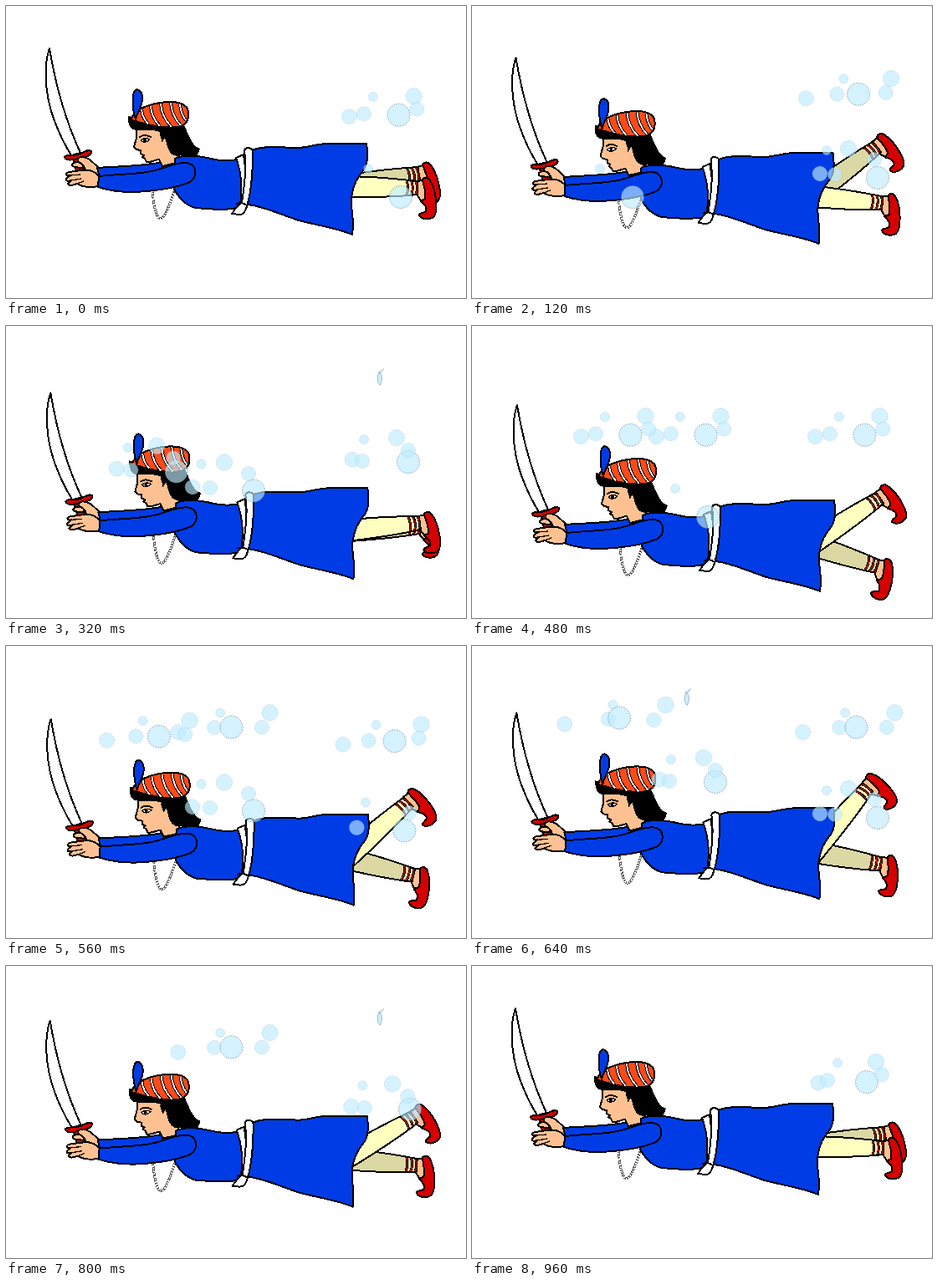
Write an HTML page that moves like this. It is 550x350 px and loops after 1 s.

```html
<!DOCTYPE html>
<html lang="en">
<head>
<meta charset="utf-8">
<title>Flying swordsman</title>
<style>
  html, body { margin: 0; width: 100%; height: 100%; overflow: hidden; background: #fff; }
  svg { display: block; width: 550px; height: 350px; }
  #hero { shape-rendering: crispEdges; }
  .ink { stroke: #000; stroke-width: 2; stroke-linejoin: round; stroke-linecap: round; }
  .line { fill: none; }
  .blue { fill: #003ce6; }
  .skin { fill: #ffc192; }
  .red { fill: #d60000; }
  .white { fill: #fff; }
  .bubble { fill: #bdebff; fill-opacity: .65; stroke: #8fa9b5; stroke-opacity: .6; stroke-width: .7; stroke-dasharray: 1.5 1.5; }
  .bubble.big { stroke: #707c84; stroke-opacity: .85; stroke-width: .9; }
</style>
</head>
<body>
<svg viewBox="0 0 550 350" xmlns="http://www.w3.org/2000/svg">
  <defs>
    <g id="shin">
      <path class="ink" d="M370 204 C430 203 466 207 492 210 L492 226 C465 229 430 230 370 229Z"/>
      <path class="line" d="M479 209 C481 215 481 221 479 227 M484.5 209 C487 215 487 221 484.5 227 M490 210 C492 215 492 221 490 226" stroke="#000" stroke-width="3"/>
      <path class="line" d="M479 210 C481 215 481 221 479 226 M484.5 210 C487 215 487 221 484.5 226 M490 211 C492 215 492 221 490 225" stroke="#b81818" stroke-width="1.3"/>
    </g>
    <g id="foot">
      <path class="ink skin" d="M491 210 L498 209 L503 222 L501 232 L496 233 L491 226Z"/>
      <path class="ink red" d="M498 208 C500 205 505 205 507 209 C511 215 513 223 514 232 C515 241 515 249 511 253 C506 257 497 256 494 251 C494 247 499 249 502 246 C504 241 500 237 496 234 L501 231 C503 224 499 215 498 208Z"/>
    </g>
  </defs>

  <g id="hero">
    <g id="farLeg" fill="#dcd8a4"><use class="foot" href="#foot"/><use href="#shin"/></g>
    <g id="nearLeg" fill="#ffffbf"><use class="foot" href="#foot"/><use href="#shin"/></g>

    <path class="line" d="M175 221 C176 234 179 255 185 255 C191 254 197 234 202 219" stroke="#555" stroke-width="2.8"/>
    <path class="line" d="M175 221 C176 234 179 255 185 255 C191 254 197 234 202 219" stroke="#fff" stroke-width="1.6" stroke-dasharray="2 1.2"/>

    <!-- sword -->
    <path class="ink white" d="M52 51 C45 70 46 105 57 135 C63 152 70 166 78 179 L89 176 C76 148 61 105 52 51Z"/>
    <path class="ink red" d="M80 183 L89 181 L94 197 L84 198Z"/>
    <path class="ink red" d="M70 181 C72 177 80 180 86 178 C92 176 98 171 102 174 C103 179 96 181 90 182 C82 184 72 187 70 181Z"/>

    <!-- far arm and hand -->
    <path class="ink skin" d="M111 194 C104 188 99 181 91 181 C85 181 84 186 88 188 C92 190 95 193 95 199 L111 204Z"/>
    <path class="ink skin" d="M89 188 C84 186 79 188 79 191 C80 194 86 193 90 194 C93 195 93 190 89 188Z"/>
    <path class="ink blue" d="M109 194 C135 192 165 192 187 187 L204 200 L112 206Z"/>

    <!-- face and hair -->
    <path class="ink skin" d="M156 144 L156 158 L153 169 L156 172 L161 173 L161 177 L165 179 L163 181 L166 183 L168 187 C173 188 179 184 183 184 L187 192 L208 187 L196 150Z"/>
    <path d="M146 132 C145 145 150 150 160 149 C168 149 176 148 184 151 C182 155 187 158 186 164 L190 158 C193 166 193 179 205 180 C214 178 221 181 228 181 L232 171 C222 168 219 155 213 143Z"/>
    <path class="ink line" d="M160 157 C164 154 169 155 173 157"/>
    <path d="M161 161 C164 158 169 158 172 160 C168 164 164 164 161 161Z" fill="#fff" stroke="#000" stroke-width="1.3"/>
    <circle cx="166" cy="161" r="2"/>

    <!-- turban -->
    <path class="ink" fill="#ff4a18" d="M150 135 C152 126 166 119 184 116 C205 113 218 117 218 128 C219 138 214 143 206 145 C190 147 171 143 155 138 C151 137 149 137 150 135Z"/>
    <g id="folds" class="line"></g>
    <path class="ink blue" d="M155 136 C151 124 149 101 157 100 C165 102 164 114 160 123 C158 128 156 131 155 136Z"/>

    <!-- robe -->
    <path class="ink blue" d="M202 183 C212 178 228 179 245 183 C258 186 270 186 280 183 L294 173 C306 168 316 169 350 170 C364 169 372 165 386 165 L431 165 C433 178 433 188 428 196 C420 206 415 214 413 230 C412 246 417 254 414 274 C396 266 372 263 350 257 C326 249 310 241 290 238 L281 241 C262 246 242 243 226 242 C211 237 207 229 201 220Z"/>
    <path class="ink blue" d="M111 204 C138 201 168 202 188 194 C199 190 212 186 220 189 C228 193 229 205 220 211 C201 219 175 222 152 223 C136 223 122 221 110 217 C108 212 109 207 111 204Z"/>

    <!-- sash -->
    <path class="ink white" d="M275 182 L284 178 C288 200 287 224 282 238 L280 238 C283 218 281 198 275 182Z"/>
    <path class="ink white" d="M285 173 C287 168 295 170 295 175 C295 202 293 224 288 240 C286 247 284 250 279 250 L270 249 C274 243 278 237 282 236 C285 215 288 195 285 173Z"/>
    <path class="ink line" d="M276 237 C282 235 285 237 288 239"/>

    <!-- near hand -->
    <path class="ink skin" d="M111 204 C104 196 97 196 90 197 L75 199 C70 201 72 204 77 203 L73 206 C70 209 73 211 78 209 L74 213 C75 216 80 215 85 213 C91 217 102 218 110 216Z"/>
    <path class="ink line" d="M77 203 L89 202 M78 209 L90 207 M85 213 L93 210" style="stroke-width:1.3"/>
  </g>

  <g id="air"></g>
</svg>

<script>
const FRAME = 40, COUNT = 25;
const $ = id => document.getElementById(id);

function add(parent, tag, attrs) {
  const el = document.createElementNS('http://www.w3.org/2000/svg', tag);
  for (const k in attrs) el.setAttribute(k, attrs[k]);
  return parent.appendChild(el);
}

// piecewise linear; the last segment runs on past its end
function lerpKeys(times, values, t) {
  let i = 0;
  while (i < times.length - 2 && t > times[i + 1]) i++;
  const k = (t - times[i]) / (times[i + 1] - times[i]);
  return values[i] + (values[i + 1] - values[i]) * k;
}

// turban folds: top x, top y, bottom x, bottom y
[[162, 124, 170, 141], [173, 120, 184, 144], [185, 117, 198, 145], [197, 116, 209, 143], [208, 118, 215, 137]]
  .forEach(([x, y, u, v]) => {
    const d = `M${x} ${y} Q${x + 1} ${(y + v) / 2 + 2} ${u} ${v}`;
    add($('folds'), 'path', { d, stroke: '#000', 'stroke-width': 3.8 });
    add($('folds'), 'path', { d, stroke: '#fff', 'stroke-width': 1.8 });
  });

const legTimes = [0, 5, 8, 12, 16, 20, 24];
const nearTurn = [0, 7.7, -7, -35, -51, -32, 0];
const farTurn = [-10.5, -56, -4, 17, 9, 4, -10.5];

// the ankle lags behind when the leg kicks up
function poseLeg(id, angle) {
  const leg = $(id);
  leg.setAttribute('transform', `rotate(${angle} 400 200)`);
  leg.querySelector('.foot').setAttribute('transform', `rotate(${Math.max(0, -angle) * .3} 494 214)`);
}

const ages = [0, 3, 5, 8, 11, 17];
const bubbles = [
  { r: 9, from: 1, x: [421, 416, 410, 414, 414, 392], y: [226, 201, 185, 160, 140, 96] },
  { r: 8.5, from: 3, x: [433, 434, 434, 426, 425, 442], y: [222, 202, 186, 162, 137, 90] },
  { r: 5.5, from: 0, x: [433, 424, 423, 428, 437, 448], y: [195, 173, 158, 136, 116, 73] },
  { r: 13.5, from: 0, x: [472, 485, 487, 481, 472, 457], y: [229, 206, 189, 163, 139, 89] },
  { r: 9.7, from: 3, x: [448, 450, 452, 467, 483, 510], y: [192, 171, 156, 134, 115, 73] },
  { r: 8.5, from: 1, x: [483, 481, 479, 481, 490, 497], y: [208, 184, 170, 149, 130, 91] }
];

const clusters = [
  { dx: 0, start: 0, rate: 1 },
  { dx: 0, start: 13, rate: 1 },
  { dx: -190, start: 6, rate: 2 },
  { dx: -190, start: 12, rate: 2 },
  { dx: -280, start: 3, rate: 4 / 3 }
];

for (const c of clusters) {
  const g = add($('air'), 'g', { transform: `translate(${c.dx} 0)` });
  c.dots = bubbles.map(b => add(g, 'circle', { r: b.r, class: b.r > 12 ? 'bubble big' : 'bubble' }));
  c.wisp = add(g, 'path', {
    d: 'M446 56 C443 61 444 68 447 71 C450 67 450 61 448 57Z M445 54 L447 57 L452 51',
    fill: '#cfeeff', stroke: '#8aa8bc', 'stroke-width': .8
  });
}

const show = (el, on) => el.setAttribute('visibility', on ? 'visible' : 'hidden');

function draw(ms) {
  const f = Math.floor(ms / FRAME) % COUNT;
  const drop = 1 - Math.abs(f - 12) / 12;
  $('hero').setAttribute('transform', `translate(${2 * drop} ${44 * drop})`);
  poseLeg('nearLeg', lerpKeys(legTimes, nearTurn, f));
  poseLeg('farLeg', lerpKeys(legTimes, farTurn, f));

  for (const c of clusters) {
    const age = (f - c.start + COUNT) % COUNT * c.rate;
    c.dots.forEach((dot, i) => {
      const b = bubbles[i];
      show(dot, age >= b.from && age < 19);
      dot.setAttribute('cx', lerpKeys(ages, b.x, age));
      dot.setAttribute('cy', lerpKeys(ages, b.y, age));
    });
    show(c.wisp, age >= 19 && age < 21);
  }
}

const begin = performance.now();
function tick() {
  draw(performance.now() - begin);
  requestAnimationFrame(tick);
}
tick();
</script>
</body>
</html>
```
